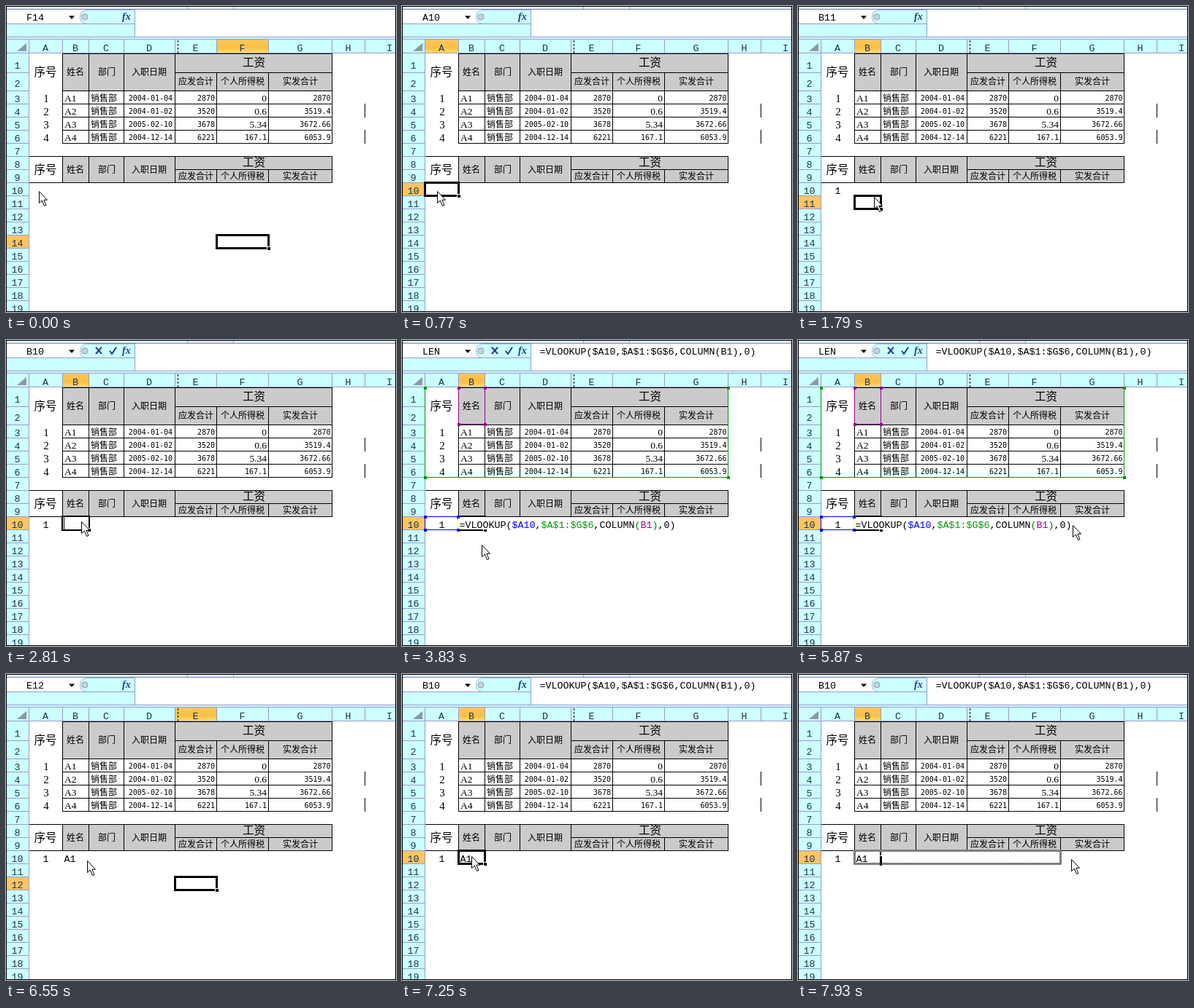
An HTML page that plays this animation: 534 px wide and 420 px high, repeating every 8000 ms.

```html
<!DOCTYPE html>
<html lang="zh-CN">
<head>
<meta charset="utf-8">
<title>Payroll lookup</title>
<style>
html, body { margin: 0; width: 100%; height: 100%; overflow: hidden; background: #fff; }
svg { display: block; width: 534px; height: 420px; }
rect { shape-rendering: crispEdges; }
text { white-space: pre; fill: #000; }
.m { font: 13.33px "Liberation Mono", "Noto Sans CJK SC", monospace; }
.n { font: 10px "DejaVu Sans Mono", monospace; }
.s { font: 13.5px "Liberation Serif", serif; }
.S { font: 15px "Liberation Serif", serif; }
.c { font: 12px "Noto Sans CJK SC", "Noto Sans CJK", sans-serif; }
.C { font: 15.5px "Noto Sans CJK SC", "Noto Sans CJK", sans-serif; }
.h { fill: #1d3450; }
.fx { font: italic bold 14px "Liberation Serif", serif; fill: #1f3f86; }
</style>
</head>
<body>
<svg viewBox="0 0 534 420">
  <defs>
    <linearGradient id="hot" x2="0" y2="1">
      <stop offset="0" stop-color="#fbc65c"/>
      <stop offset=".6" stop-color="#fcbf45"/>
      <stop offset="1" stop-color="#ffe668"/>
    </linearGradient>
    <pattern id="check" width="2" height="2" patternUnits="userSpaceOnUse">
      <rect width="2" height="2" fill="#fff"/>
      <rect width="1" height="1"/><rect x="1" y="1" width="1" height="1"/>
    </pattern>
  </defs>
  <g id="sheet"></g>
  <g id="live"></g>
</svg>
<script>
const LOOP = 8000;
const CYAN = '#ccffff', EDGE = '#9a9acb', GRAY = '#cbcbcb', HOT = '#fdc561';
const X = [31, 77, 113, 161, 231, 288, 359, 446, 491, 560];   // column edges
const Y = [65, 91, 116];                                      // row edges
for (let r = 3; r < 20; r++) Y.push(116 + (r - 2) * 18);

// time, selected cell, pointer x, pointer y, mode, caret x
const STEPS = [
  [0, 'F14', 45, 254, 'ready', 0],
  [100, 'A10', 45, 254, 'ready', 0],
  [770, 'A10', 48, 254, 'ready', 0],
  [1110, 'A10', 48, 254, 'number', 59],
  [1450, 'A10', 104, 268, 'number', 59],
  [1790, 'B11', 104, 262, 'ready', 0],
  [2130, 'B10', 106, 255, 'ready', 0],
  [2470, 'B10', 106, 255, 'empty', 79],
  [2810, 'B10', 103, 249, 'empty', 79],
  [3150, 'B10', 103, 249, 'formula', 376],
  [3490, 'B10', 113, 262, 'formula', 376],
  [3830, 'B10', 109, 281, 'formula', 0],
  [4170, 'B10', 148, 269, 'formula', 376],
  [4510, 'B10', 301, 262, 'formula', 376],
  [4850, 'B10', 126, 254, 'formula', 0],
  [5190, 'B10', 208, 252, 'formula', 376],
  [5530, 'B10', 365, 253, 'formula', 376],
  [5870, 'B10', 376, 254, 'formula', 0],
  [6210, 'B10', 262, 291, 'ready', 0],
  [6550, 'E12', 111, 256, 'ready', 0],
  [6910, 'E12', 89, 246, 'ready', 0],
  [7250, 'B10', 95, 250, 'ready', 0],
  [7590, 'B10', 113, 258, 'ready', 0],
  [7930, 'B10', 374, 254, 'drag', 0]
];

const PARTS = [['=VLOOKUP(', '#000'], ['$A10', '#0000ff'], [',', '#000'], ['$A$1:$G$6', '#009900'],
  [',COLUMN', '#000'], ['(', '#007f00'], ['B1', '#990099'], [')', '#007f00'], [',0)', '#000']];
const FORMULA = PARTS.map(p => p[0]).join('');

const box = (x, y, w, h, fill = '#000') =>
  `<rect x="${x}" y="${y}" width="${w}" height="${h}" fill="${fill}"/>`;
const across = (x1, x2, y, c) => box(x1, y, x2 - x1 + 1, 1, c);
const down = (x, y1, y2, c) => box(x, y1, 1, y2 - y1 + 1, c);
const text = (x, y, s, cls, anchor = 'start') =>
  `<text x="${x}" y="${y}" class="${cls}" text-anchor="${anchor}">${s}</text>`;
const mid = (x, y, s, cls) => text(x, y, s, cls, 'middle');
const end = (x, y, s, cls) => text(x, y, s, cls, 'end');
const ring = (x1, y1, x2, y2, w, c) =>
  `<rect x="${x1}" y="${y1}" width="${x2 - x1}" height="${y2 - y1}" fill="none" stroke="${c}" stroke-width="${w}"/>`;

function heading(top, split, bottom) {
  const cy = Math.floor((top + bottom) / 2);
  let s = box(78, top, 369, bottom - top, GRAY);
  s += across(231, 446, split);
  for (const i of [1, 2, 3, 4, 7]) s += down(X[i], top, bottom);
  for (const i of [5, 6]) s += down(X[i], split, bottom);
  s += mid(54, cy + 6, '序号', 'C');
  [['姓名', 95], ['部门', 138], ['入职日期', 196]].forEach(([w, x]) => s += mid(x, cy + 5, w, 'c'));
  s += mid(339.5, Math.floor((top + split) / 2) + 5, '工资', 'C');
  [['应发合计', 260], ['个人所得税', 324], ['实发合计', 403]]
    .forEach(([w, x]) => s += mid(x, Math.floor((split + bottom) / 2) + 5, w, 'c'));
  return s + across(78, 446, top) + across(78, 446, bottom);
}

function drawSheet() {
  let s = box(0, 0, 534, 420, '#fff');
  // toolbar edge and formula bar
  s += box(0, 0, 534, 4, '#dff4fb') + box(0, 4, 534, 1, '#8080ad');
  s += box(1, 24, 176, 18, CYAN);
  s += `<path d="M176 5.5H110Q101.5 6.5 101.5 15T110 24.5H176" fill="${CYAN}" stroke="#9fb4cc"/>`;
  s += across(1, 176, 24, EDGE) + down(176, 5, 42, EDGE);
  s += '<circle cx="108" cy="15" r="4" fill="#c3d6e0" stroke="#8d9eae"/>';
  s += '<path d="M86 13.5h8l-4 4.5z"/>';
  s += text(159, 19, 'fx', 'fx');
  s += box(0, 42, 534, 5, CYAN) + across(0, 533, 42, EDGE);
  // payroll table
  s += heading(65, 91, 116) + heading(206, 224, 242);
  s += across(32, 77, 206) + across(32, 77, 242);
  const rows = [
    ['2004-01-04', '2870', '0', '2870'],
    ['2004-01-02', '3520', '0.6', '3519.4'],
    ['2005-02-10', '3678', '5.34', '3672.66'],
    ['2004-12-14', '6221', '167.1', '6053.9']
  ];
  rows.forEach(([date, gross, tax, net], i) => {
    const y = Y[i + 2];
    s += mid(55, y + 16, i + 1, 'S') + text(80, y + 15, 'A' + (i + 1), 's');
    s += text(116, y + 15, '销售部', 'c');
    s += end(228, y + 14, date, 'n') + end(286, y + 14, gross, 'n');
    s += end(357, y + (i < 3 ? 15 : 14), tax, i < 3 ? 's' : 'n') + end(444.5, y + 14, net, 'n');
    s += across(77, 446, y + 18);
  });
  for (let i = 1; i < 8; i++) s += down(X[i], 116, 188);
  s += down(491, 134, 152) + down(491, 170, 188);
  return s;
}

function headers(col, row) {
  let s = box(0, 45, 534, 20, CYAN) + box(0, 65, 31, 355, CYAN);
  s += across(0, 533, 45, EDGE);
  s += '<path d="M28 51V62H15Z" fill="#8b9aa2"/>';
  for (let i = 0; i < 9; i++) {
    if (i === col) s += box(X[i] + 1, 46, X[i + 1] - X[i], 19, 'url(#hot)');
    s += down(X[i], 46, 64, EDGE);
    const cx = i === 8 ? 525 : (X[i] + X[i + 1]) / 2;
    s += mid(cx, 62, 'ABCDEFGHI'[i], 'm h');
  }
  s += across(0, 533, 64, EDGE);
  for (let r = 1; r < 20; r++) {
    const y = Y[r - 1], y2 = Y[r] || 422;
    if (r === row) s += box(1, y + 1, 30, y2 - y, HOT);
    s += across(1, 30, y2, EDGE);
    s += mid(15.5, r < 3 ? y2 - 5 : y + 15.5, r, 'm h');
  }
  s += down(31, 46, 419, EDGE);
  for (let y = 47; y < 65; y += 5) s += box(235, y, 1, 3);
  return s;
}

function selection(col, row) {
  const x2 = X[col + 1], y2 = Y[row];
  return ring(X[col] + .5, Y[row - 1] + .5, x2 + .5, y2 + .5, 3, '#000') +
    box(x2 - 2, y2 - 2, 5, 5, '#fff') + box(x2 - 1, y2 - 1, 4, 4);
}

// A referenced range; its top line is hidden where it meets the column headers.
function marked(x1, y1, x2, y2, color, right = color) {
  let s = down(x1, y1, y2, color) + down(x2, y1, y2, right) + across(x1, x2, y2, color);
  if (y1 > Y[0]) s += across(x1, x2, y1, color);
  for (const x of [x1, x2]) for (const y of [y1, y2]) s += box(x - 1, y - 1, 4, 4, color);
  return s;
}

function pointer(x, y) {
  return `<path transform="translate(${x} ${y})" d="M.5 .5V16.5L4.3 13 7.5 20.5 10 19.4 6.8 12.2H11.5Z" ` +
    'fill="#fff" stroke="#000"/>';
}

function drawLive([time, cell, px, py, mode, caret]) {
  const col = cell.charCodeAt(0) - 65, row = +cell.slice(1);
  const editing = ['number', 'empty', 'formula'].includes(mode);
  const done = time >= 6210;
  let s = headers(col, row);

  s += box(248, 1, 64, 2, editing ? '#dadfe6' : '#eef8ff') + down(248, 1, 3, EDGE) + down(311, 1, 3, EDGE);
  s += text(28, 20, mode === 'formula' ? 'LEN' : cell, 'm');
  if (editing) {
    s += '<path d="M123 10l8 9m0-9l-8 9" fill="none" stroke="#27398a" stroke-width="2"/>';
    s += '<path d="M142 15l3 4 6-9" fill="none" stroke="#27398a" stroke-width="2"/>';
  }
  if (mode === 'number') s += text(189, 20, '1', 'm');
  if (mode === 'formula' || (done && cell === 'B10')) s += text(188.5, 20, FORMULA, 'm');

  if (mode === 'drag') {
    s += ring(77.5, 242.5, 359.5, 260.5, 3, 'url(#check)');
    s += box(112, 244, 2, 5) + box(112, 250, 3, 13);
  } else {
    s += selection(col, row);
  }
  if (editing) {
    const right = mode === 'formula' ? 377 : X[col + 1];
    s += box(X[col] + 1, 243, right - X[col] - 1, 17, '#fff');
  }
  if (mode === 'formula') {
    s += box(76, 243, 2, 18, '#fff');
    s += marked(31, 65, 446, 188, '#009900') + marked(77, 65, 113, 115, '#990099');
    s += marked(31, 242, 76, 260, '#0000ff', '#ffff33');
    s += text(78.5, 258, PARTS.map(([w, c]) => `<tspan style="fill:${c}">${w}</tspan>`).join(''), 'm');
  }
  if (time >= 1110) s += mid(54.5, 258, '1', 'm');
  if (done) s += text(79.5, 258, 'A1', 'm');
  if (caret) s += down(caret, 243, 259);
  return s + ring(.5, .5, 533.5, 419.5, 1, '#000') + pointer(px, py);
}

const live = document.getElementById('live');
document.getElementById('sheet').innerHTML = drawSheet();
const start = performance.now();
let shown = null;

function tick() {
  const t = (performance.now() - start) % LOOP;
  const step = STEPS.findLast(s => s[0] <= t) || STEPS[0];
  if (step !== shown) {
    shown = step;
    live.innerHTML = drawLive(step);
  }
  requestAnimationFrame(tick);
}
tick();
</script>
</body>
</html>
```
